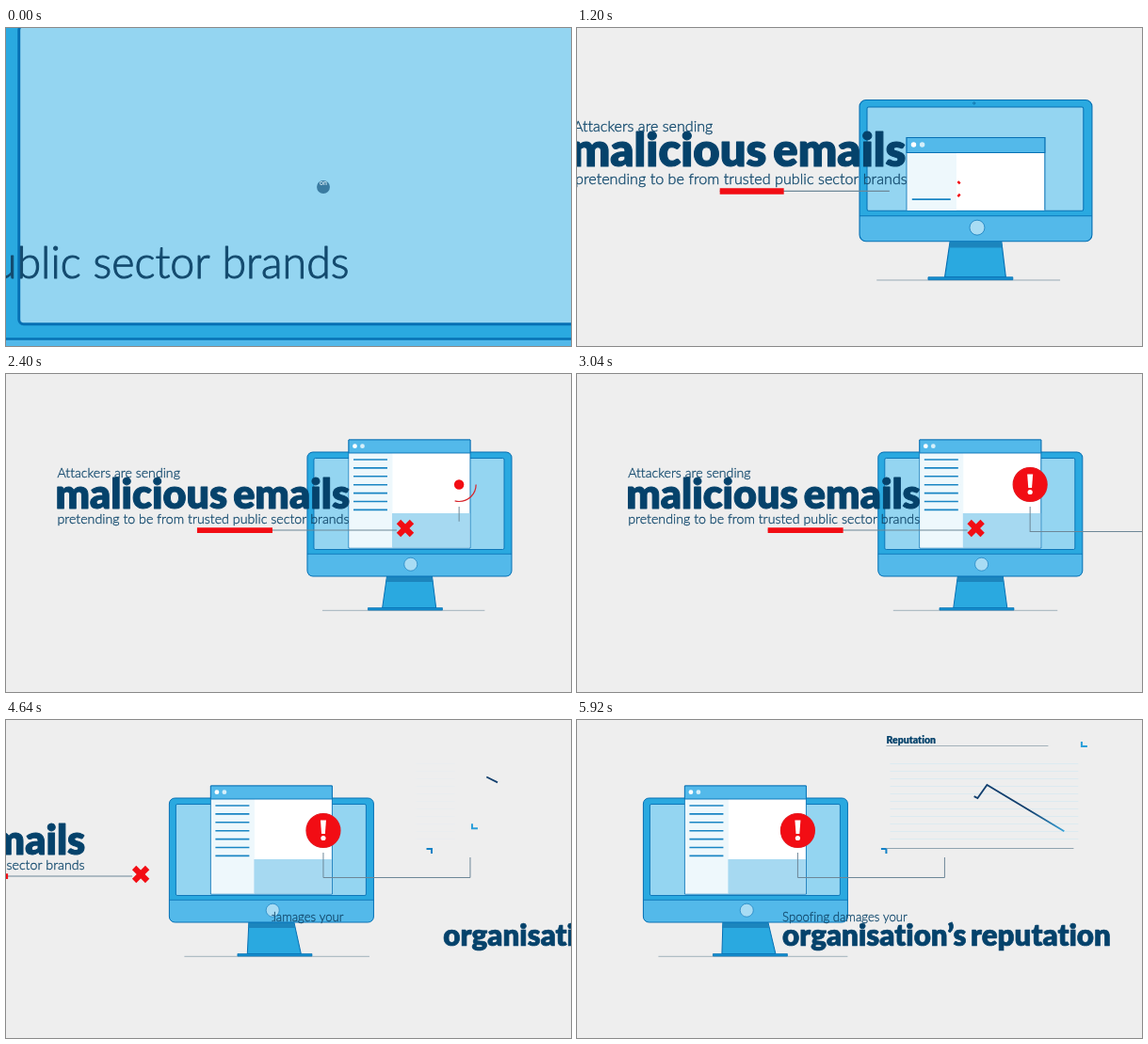
Animation of 600 by 338 pixels, one loop 6 s. Source, as an HTML page with a canvas:

```html
<!DOCTYPE html>
<html lang="en">
<head>
<meta charset="utf-8">
<title>Malicious emails</title>
<style>
html, body { margin: 0; width: 100%; height: 100%; overflow: hidden; background: #eee; }
canvas { display: block; width: 600px; height: 338px; }
</style>
</head>
<body>
<canvas id="stage" width="600" height="338"></canvas>
<script>
const g = document.getElementById('stage').getContext('2d');
const LOOP = 6000, TAU = Math.PI * 2;
const NAVY = '#05426b', INK = '#134a6e', EDGE = '#0670b4', BLUE = '#2aa9e0',
      CHIN = '#53b9ea', PALE = '#94d5f1', RED = '#f20d14', WIRE = '#6d8797';

const span = (t, a, b) => Math.min(1, Math.max(0, (t - a) / (b - a)));
const ease = (t, a, b) => 1 - (1 - span(t, a, b)) ** 3;
const mix = (a, b, u) => a + (b - a) * u;

// The two camera moves: extra magnification at the start, then a pan from 0 to 1.
const zoomAt = t => 2.27 * Math.exp(-((t / 668) ** 1.757));
const panAt = t => 1 / (1 + Math.exp((4567 - t) / 212));

function shape(fill, stroke, width = 1) {
  if (fill) { g.fillStyle = fill; g.fill(); }
  if (stroke) { g.strokeStyle = stroke; g.lineWidth = width; g.stroke(); }
}
function box(x, y, w, h, fill, stroke, r = 0, width = 1) {
  g.beginPath(); g.roundRect(x, y, w, h, r); shape(fill, stroke, width);
}
function disc(x, y, r, fill, stroke, width) {
  g.beginPath(); g.arc(x, y, r, 0, TAU); shape(fill, stroke, width);
}
function poly(points, stroke, width = 1, fill) {
  g.beginPath();
  points.forEach(p => g.lineTo(...p));
  shape(fill, stroke, width);
}
// The part of a polyline between two distances along it.
function trace(points, from, to, stroke, width) {
  if (to <= from) return;
  g.save();
  g.setLineDash([to - from, 9999]);
  g.lineDashOffset = -from;
  poly(points, stroke, width);
  g.restore();
}
function label(text, x, y, size, weight, color) {
  g.font = `${weight} ${size}px Lato, "Open Sans", sans-serif`;
  g.letterSpacing = '0.01px';   // keeps letters from joining
  g.wordSpacing = weight === 900 ? `${-.09 * size}px` : '0px';
  g.lineJoin = 'round';
  g.fillStyle = g.strokeStyle = color;
  g.lineWidth = size * .022;
  g.fillText(text, x, y);
  g.strokeText(text, x, y);
  g.lineJoin = 'miter';
}
function group(x, y, scale, draw) {
  g.save();
  g.translate(x, y);
  g.scale(scale, scale);
  draw();
  g.restore();
}
function clipped(x, y, w, h, draw, r = 0) {
  g.save();
  g.beginPath(); g.roundRect(x, y, w, h, r); g.clip();
  draw();
  g.restore();
}

function drawStand(lean) {
  poly([[336, 251.3], [507 + lean * 3, 251.3]], '#8fa3af', .8);
  const b = lean * .4;
  poly([[404.5, 215], [452.5, 215], [456.5 + b, 248.5], [399.5 + b, 248.5], [404.5, 215]], EDGE, 1, BLUE);
  poly([[404.5, 215.5], [452.5, 215.5], [453.5, 221], [403.5, 221]], null, 0, '#1c85bd');
  box(384 + lean, 248.5, 79, 2.5, '#168fce', EDGE, 0, .7);
}

function drawScreen() {
  box(320, 83, 217, 132, BLUE, null, 6);
  clipped(320, 83, 217, 132, () => box(315, 191.3, 227, 30, CHIN, EDGE, 0, .8), 6);
  box(320, 83, 217, 132, null, EDGE, 6);
  box(327, 89.5, 202, 97, PALE, EDGE, 1.5, .9);
  disc(427, 86, 1, null, '#0a5b93', .6);
  disc(429.8, 202.2, 7, '#a8dcf4', EDGE, .6);
}

function drawMail(t) {
  const top = mix(187, 70, ease(t, 960, 1900)), late = 1 - ease(t, 1000, 2000);
  clipped(360, 60, 140, 126, () => {
    box(364, top, 129, 115, '#fff', EDGE, 0, .9);
    box(364.5, top + 14, 46, 100.5, '#eef8fc');
    box(410, top + 78, 82.5, 36.5, '#a6d9f1');
    box(364, top, 129, 14, CHIN, EDGE, 0, .9);
    disc(370.5, top + 6.7, 2.4, '#fff');
    disc(378.5, top + 6.7, 2.4, '#d5effa');
    for (let i = 0; i < 7; i++) {
      const y = top + 21 + i * 8.9 + late * (72 + 16 * i);
      poly([[369, y], [405, y]], '#1a86c4', 1.6);
    }
  });
}

function drawAlert(t, x) {
  const y = 117.5, pop = ease(t, 2360, 2740), mark = ease(t, 2440, 2760);
  const wire = [[x, 141], [x, 167.5], [x + 156, 167.5], [x + 156, 145]];
  trace(wire, 0, 204 * ease(t, 2360, 3900), WIRE, 1);
  g.beginPath(); g.arc(x, y, 18, 0, TAU * pop); shape(null, '#d8232a', 1.2);
  disc(x, y, 18 * pop, RED);
  group(x, y, mark, () => {
    poly([[-3, -11], [3, -11], [1.9, 3.6], [-1.9, 3.6]], null, 0, '#fff');
    disc(0, 8, 2.6, '#fff');
  });
}

function drawChart(t) {
  if (t < 4580) return;
  const grow = ease(t, 4580, 5400), title = ease(t, 4900, 5400);
  g.globalAlpha = .35 * grow;
  for (let y = 46.5; y < 134; y += 8) poly([[332, y], [332 + 200 * grow, y]], '#b9e2f4');
  g.globalAlpha = 1;

  const left = mix(354, 328, grow), right = mix(354, 535.5, grow), top = mix(138, 28, grow);
  poly([[left - 5.5, 137], [left, 137], [left, 142]], '#1482c6', 2);
  poly([[right, top - 5], [right, top], [right + 6, top]], '#2a9fda', 2);
  poly([[328, 27.5], [328 + 172 * title, 27.5]], '#a3b1ba');
  poly([[328, 136.5], [328 + 199 * title, 136.5]], '#8fa3af');
  clipped(327, 8, 65, 19, () => label('Reputation', 328, 25 + 14 * (1 - title), 10.5, 900, NAVY));

  const ink = g.createLinearGradient(480, 0, 520, 0);
  ink.addColorStop(0, '#123f6e');
  ink.addColorStop(1, '#3aa9e0');
  const run = span(t, 4640, 5920), from = mix(88, 104, run);
  g.translate(0, -17 * (1 - grow));
  trace([[328, 35], [425, 83], [435, 69], [517.5, 118.5]], from, from + mix(13, 117, run), ink, 1.8);
}

function drawCross(t) {
  const grow = span(t, 1160, 1500), width = mix(1.6, 6.2, grow);
  const x = mix(418, 424, grow), y = 164, a = 7;
  for (const side of [-a, a]) {
    trace([[x - a, y + side], [x + a, y - side]], 0, 24 * grow, RED, width);
  }
}

function drawHeadline(t, slide) {
  label('Attackers are sending', 54.5 + slide, 110, 14.15, 300, INK);
  label('malicious emails', 52.5 + slide, 142.7, 43, 900, NAVY);
  label('pretending to be from trusted public sector brands', 54.5, 159.3, 14.22, 300, INK);
  const grow = ease(t, 760, 1960), x = mix(150, 203, grow);
  poly([[x, 166], [x + 212 * grow, 166]], WIRE);
  box(x, 163.2, 80 * grow, 5.8, RED);
  drawCross(t);
}

function drawClosing(rest) {
  const edge = 218 + 156 * rest;
  clipped(edge, 195, 300, 25, () =>
    label('Spoofing damages your', 218 + 19 * rest, 214.3, 13.15, 300, INK));
  label('organisation’s reputation', 217 + 598 * rest, 239.8, 31.3, 900, NAVY);
}

function frame(t) {
  g.fillStyle = '#eee';
  g.fillRect(0, 0, 600, 338);
  const zoom = zoomAt(t), pan = panAt(t), lean = 10 * pan ** .3;
  group(-465 * zoom - 250 * pan, -130 * zoom, 1 + zoom, () => {
    drawStand(lean);
    drawScreen();
    drawMail(t);
    drawAlert(t, 481 + lean * .3);
  });
  group(250 * (1 - pan), 0, 1, () => drawChart(t));
  // The headline lies nearer to the camera, so it moves further.
  group(-465 * zoom + 7 * zoom ** 4.25 - 479 * pan, -112.5 * zoom, 1 + zoom,
    () => drawHeadline(t, -36 * zoom ** 1.5));
  drawClosing(1 - pan);
  group(337, 169, 1 - span(t, 0, 160), () => {
    disc(0, 0, 7, '#3a7ba1');
    label('on', -4, -2, 7, 400, '#d8eef8');
  });
}

const start = performance.now();
function tick() {
  frame((performance.now() - start) % LOOP);
  requestAnimationFrame(tick);
}
tick();
</script>
</body>
</html>
```
